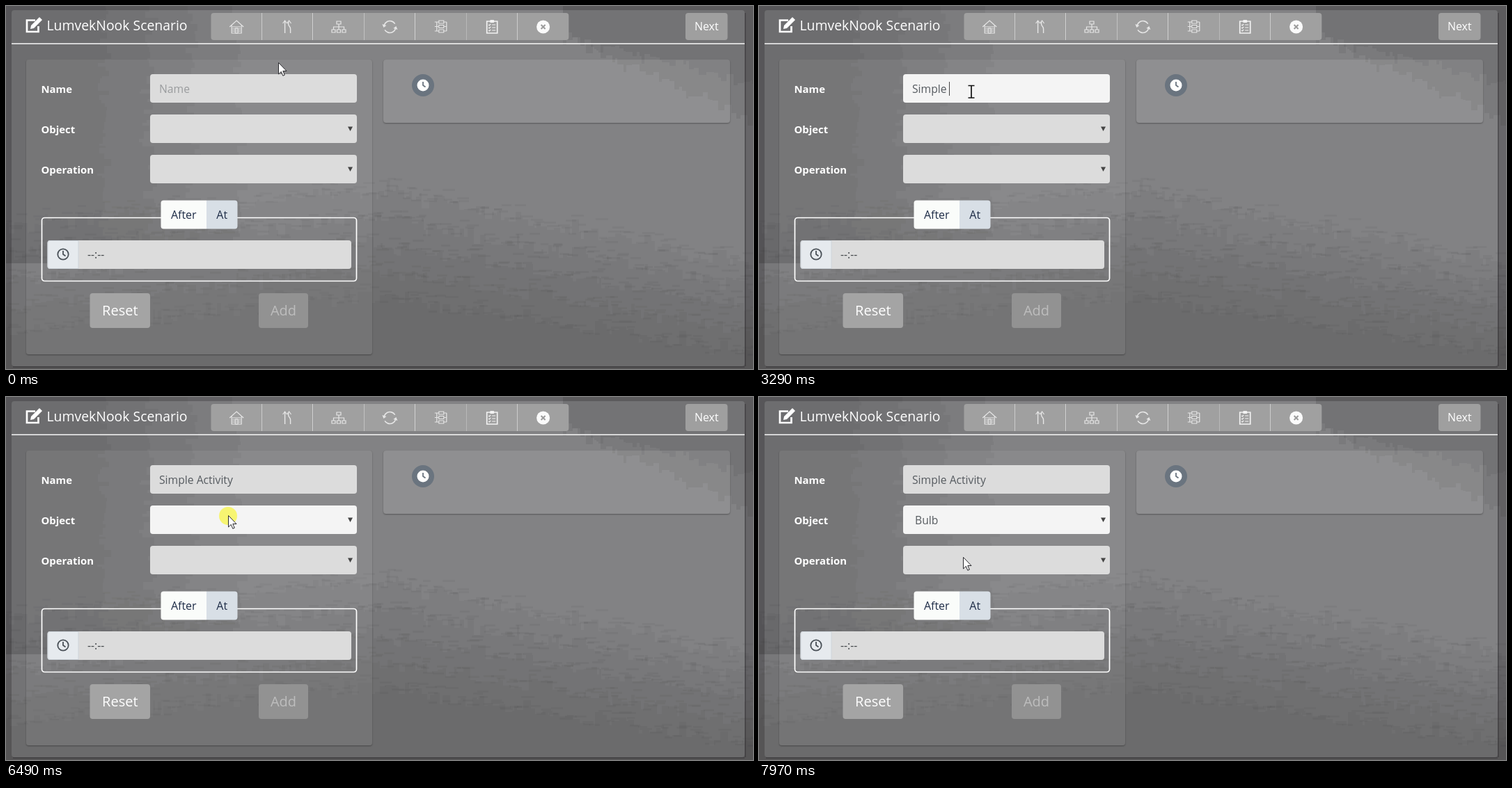
An HTML page with a canvas for the animation above (8 s loop, 1073 px wide and 522 px high).

```html
<!DOCTYPE html>
<html lang="en">
<head>
<meta charset="utf-8">
<title>Scenario editor</title>
<style>
  html, body { margin: 0; width: 100%; height: 100%; overflow: hidden; background: #5d5b5d; }
  canvas { display: block; }
</style>
</head>
<body>
<canvas id="stage" width="1073" height="522"></canvas>
<script>
const W = 1073, H = 522, LOOP = 8000, STEP = 80;
const FONT = '"Open Sans", "Noto Sans", sans-serif';
const INK = '#565b60', IDLE = '#dcdcdc', LIT = '#f4f4f4', ICON = '#e6e6e6';
const stage = document.getElementById('stage').getContext('2d');
const still = document.createElement('canvas');
still.width = W;
still.height = H;
let c = still.getContext('2d');

let seed = 7;
const rnd = () => (seed = (seed * 16807) % 2147483647) / 2147483647;
const jag = size => Math.round((rnd() + rnd() - 1) * size);
const times = (n, f) => { for (let i = 0; i < n; i++) f(i); };
const during = (t, a, b) => t >= a && t < b;

function box(x, y, w, h, fill, r = 4) {
  c.beginPath();
  c.roundRect(x, y, w, h, r);
  c.fillStyle = fill;
  c.fill();
}

function outline(x, y, w, h, stroke, width, r = 0) {
  c.beginPath();
  c.roundRect(x, y, w, h, r);
  c.strokeStyle = stroke;
  c.lineWidth = width;
  c.stroke();
}

function text(s, x, y, size, fill, align = 'left', weight = 400) {
  c.font = `${weight} ${size}px ${FONT}`;
  c.textAlign = align;
  c.fillStyle = fill;
  c.fillText(s, x, y);
}

function arc(r, a, b, stroke, width) {
  c.beginPath();
  c.arc(0, 0, r, a, b);
  c.strokeStyle = stroke;
  c.lineWidth = width;
  c.stroke();
}

function disc(x, y, r, fill) {
  c.beginPath();
  c.arc(x, y, r, 0, 7);
  c.fillStyle = fill;
  c.fill();
}

function path(d, stroke, width = 1.2, fill) {
  const p = new Path2D(d);
  if (fill) { c.fillStyle = fill; c.fill(p); }
  if (stroke) { c.strokeStyle = stroke; c.lineWidth = width; c.stroke(p); }
}

function at(x, y, draw, turn = 0) {
  c.save();
  c.translate(x, y);
  c.rotate(turn);
  draw();
  c.restore();
}

// Stacked translucent layers, each with a blocky random edge
function strata(layers, alpha, from, to, slice) {
  c.fillStyle = `rgba(0,0,0,${alpha})`;
  times(layers, i => {
    for (let p = from, size; p < to; p += size) {
      size = 3 + Math.floor(rnd() * 9);
      slice(p, Math.min(size, to - p), i);
    }
  });
}

function backdrop() {
  c.fillStyle = '#828284';
  c.fillRect(0, 0, W, H);
  strata(4, .045, 0, 370, (y, h, i) => c.fillRect(0, y, 140 + 65 * i + jag(14), h));
  strata(2, .06, 800, W, (x, w, i) => c.fillRect(x, 0, w, Math.round(45 + (x - 800) * (.45 - .2 * i)) + jag(12)));
  strata(5, .038, 0, W, (x, w, i) => {
    const slope = x < 526 ? .1 : .2 - .012 * i;
    const y = Math.round(264 + 38 * i + Math.abs(x - 526) * slope) + jag(16);
    c.fillRect(x, y, w, H - y);
    c.fillRect(x + jag(8), y - 6 - jag(12), 8 + w, 3);
  });

  c.fillStyle = 'rgba(20,16,20,.24)';
  c.beginPath();
  c.rect(0, 0, W, H);
  c.roundRect(8, 6, 1053, 512, 4);
  c.fill('evenodd');
  c.fillRect(10, 518, 1051, 2);
  c.fillRect(1061, 10, 2, 508);
}

function card(x, y, w, h, alpha) {
  c.save();
  c.beginPath();
  c.rect(0, 0, W, H);
  c.roundRect(x, y, w, h, 4);
  c.clip('evenodd');
  c.shadowColor = 'rgba(0,0,0,.35)';
  c.shadowBlur = 2;
  c.shadowOffsetY = 1;
  box(x, y, w, h, '#777');
  c.restore();
  box(x, y, w, h, `rgba(255,255,255,${alpha})`);
}

function arrowUp(x) {
  path(`M${x - 3} -5L${x} -9L${x + 3} -5`, ICON);
}

function house() {
  path('M-10 0L0 -9L10 0M-7 -2V9H7V-2', ICON);
  times(3, i => path(`M-6 ${i * 3}H6`, ICON, 1));
  outline(-2, 2, 4, 7, ICON, 1);
}

function fork() {
  path('M-4 9V-8M4 9V3C4 -1 1 -1 1 -4V-8', ICON, 1.4);
  arrowUp(-4);
  arrowUp(2);
}

function tree() {
  outline(-3, -8, 6, 4, ICON, 1.2);
  path('M0 -4V4M-7.5 4V0H7.5V4', ICON);
  times(3, i => outline(-10 + i * 7.5, 4, 5, 4, ICON, 1.2));
}

function cycle() {
  times(2, i => at(0, 0, () => {
    arc(8.5, .3, 2.6, ICON, 1.6);
    path('M5 2L9 -1L11 4Z', null, 1, ICON);
  }, i * Math.PI));
}

function circuit() {
  times(3, i => {
    outline(-3, -9 + i * 6.5, 7, 4, ICON, 1.1);
    path(`M-9 ${-7 + i * 6.5}H-3M4 ${-7 + i * 6.5}H8`, ICON);
  });
  path('M-6 -7V6M8 -7V6', ICON);
}

function checklist() {
  outline(-7.5, -8, 15, 17, '#f2f2f2', 1.7);
  box(-3, -10, 6, 4, '#f2f2f2', 1);
  times(3, i => path(`M-5 ${i * 4 - 3}L-4 ${i * 4 - 2}L-2 ${i * 4 - 4}M0 ${i * 4 - 3}H5`, '#f2f2f2'));
}

function close() {
  disc(0, 0, 9.5, '#fbfbfb');
  path('M-3 -3L3 3M3 -3L-3 3', '#9c9c9c', 2);
}

const icons = [house, fork, tree, cycle, circuit, checklist, close];

function tool(i, fill) {
  const w = 73.4, x = 294.5 + i * w, last = icons.length - 1;
  box(x, 10, w, 39, fill, i === 0 ? [4, 0, 0, 4] : i === last ? [0, 4, 4, 0] : 0);
  at(x + w / 2, 30, icons[i]);
  if (i < last) box(Math.round(x + w) - 1, 10, 1, 39, '#d2d2d2', 0);
}

function button(label, x, y, w, h, size, fill, ink = '#fff', r = 4) {
  box(x, y, w, h, fill, r);
  text(label, x + w / 2, y + h / 2 + size * .36, size, ink, 'center');
}

function drawStill() {
  backdrop();

  at(28, 16, () => {
    path('M14 4.5H2V21H18.5V13', '#fff', 2.7);
    path('M7 17L8 12L20 0L24 4L12 16Z', null, 1, '#fff');
  });
  text('LumvekNook Scenario', 58.5, 34.5, 19.4, '#fff');
  icons.forEach((_, i) => tool(i, '#a0a0a0'));
  button('Next', 976, 10, 60.5, 39, 16, '#9f9f9f');
  box(8, 53.5, 1053, 1.6, '#f6f6f6', 0);

  card(29, 77, 497, 424, .06);
  card(542, 77, 498, 91, .1);
  disc(599, 114, 16, '#6a747f');
  disc(599, 114, 8.5, '#fff');
  at(599, 114, () => path('M0 -5V0L3.5 2.5', '#6a747f', 1.8));

  ['Name', 'Object', 'Operation'].forEach((s, i) =>
    text(s, 50.5, 124.5 + i * 58, 14.9, '#fff', 'left', 700));

  outline(51.5, 304.5, 452, 91, '#fff', 1.7, 4);
  button('After', 222.5, 279.5, 65.5, 41, 16, '#fafcfa', '#1f2d48', [4, 0, 0, 4]);
  button('At', 288, 279.5, 44.5, 41, 16, '#d8dfe6', '#1f2d48', [0, 4, 4, 0]);

  box(59.5, 337, 436.5, 41, IDLE);
  box(59.5, 337, 45, 41, '#ced4da', [4, 0, 0, 4]);
  box(60.5, 338, 43, 39, '#e6eaee', [3, 0, 0, 3]);
  at(82, 357, () => {
    arc(7.7, 0, 7, '#495057', 1.8);
    path('M0 -5V0L3.5 2.5', '#495057', 1.8);
  });
  text('--:--', 117, 363, 15.7, '#45494d');

  button('Reset', 120.5, 413, 86.5, 50, 20, '#a4a4a4');
  button('Add', 363, 413, 71, 50, 20, '#929292', '#bdbdbd');
}

const moves = [
  { from: 70, to: 470, x: 331, y: 42 },
  { from: 700, to: 940, x: 328, y: 93, ease: 3 },
  { from: 1090, to: 1340, x: 305, y: 123 },
  { from: 5940, to: 6410, x: 319, y: 170 },
  { from: 6800, to: 7350, x: 283, y: 224 },
  { from: 7820, to: 7970, x: 293, y: 230 }
];

// The pointer eases out along each leg, in steps of about 80 ms
function pointer(t) {
  let x = 391, y = 81;
  for (const m of moves) {
    if (t < m.from) break;
    const n = Math.round((m.to - m.from) / STEP) + 1;
    const k = Math.min(n, Math.floor((t - m.from) / STEP + .1) + 1);
    const e = t >= m.to ? 1 : 1 - (1 - k / n) ** (m.ease || 1.4);
    x += (m.x - x) * e;
    y += (m.y - y) * e;
  }
  return [Math.round(x), Math.round(y)];
}

// Each word is typed at an even pace, with a pause between
const words = [
  { text: 'Simple ', start: 2050, pace: 205 },
  { text: 'Activity', start: 3770, pace: 231 }
];
const typedAt = t => words.map(w =>
  w.text.slice(0, Math.max(0, Math.floor((t - w.start) / w.pace) + 1))).join('');

function select(y, lit, value) {
  box(207, y, 297, 41, lit ? LIT : IDLE);
  text(value, 224, y + 26.5, 15.7, INK);
  path(`M491 ${y + 17.5}H498L494.5 ${y + 24}Z`, null, 1, '#444');
}

function nameField(t) {
  const typed = typedAt(t);
  box(207, 98, 297, 41, during(t, 1340, 6410) ? LIT : IDLE);
  text(typed || 'Name', 220, 124.5, 15.7, typed ? INK : '#9a9c9e');
  if (during(t, 1340, 1880) || during(t, 2050, 5940)) {
    const w = typed ? c.measureText(typed).width : 0;
    box(Math.round(219.5 + w), 109, 1, 20, '#444', 0);
  }
}

function menu(hover) {
  box(208, 196, 296.5, 88, '#8fa9c4', 0);
  box(209, 196, 295, 87, '#fff', 0);
  box(209, 196 + hover * 22, 295, 22, '#1e90ff', 0);
  ['Bulb', 'TV', 'Alarm'].forEach((s, i) =>
    text(s, 226.5, 234.5 + i * 21.7, 15.7, hover === i + 1 ? '#fff' : INK));
}

function cursor(t) {
  const [x, y] = pointer(t);
  const pressed = [1340, 6410, 7500].some(p => during(t, p, p + 2 * STEP - 10));
  if (pressed) disc(x, y + 1, 13, 'rgba(248,245,62,.72)');
  const beam = t > 1000 && y > 98 && y < 139;
  at(x, y, () => {
    if (beam) path('M-4.5 -8.5H4.5M0 -8V9M-4.5 9H4.5', '#111', 1.7);
    else path('M.5 .5V17L4.3 13.4L6.8 19.3L9.3 18.2L6.8 12.5H12Z', '#2b2b2f', 1, '#fff');
  });
}

function draw(t) {
  c.drawImage(still, 0, 0);
  if (during(t, 310, 860)) tool(0, '#b4b4b4');
  nameField(t);
  select(156, t >= 6410, t >= 7570 ? 'Bulb' : '');
  select(214, false, '');
  if (during(t, 6570, 7570)) menu(pointer(t)[1] > 218 ? 1 : 0);
  cursor(t);
}

drawStill();
c = stage;
const start = performance.now();
function tick() {
  draw((performance.now() - start) % LOOP);
  requestAnimationFrame(tick);
}
tick();
</script>
</body>
</html>
```
